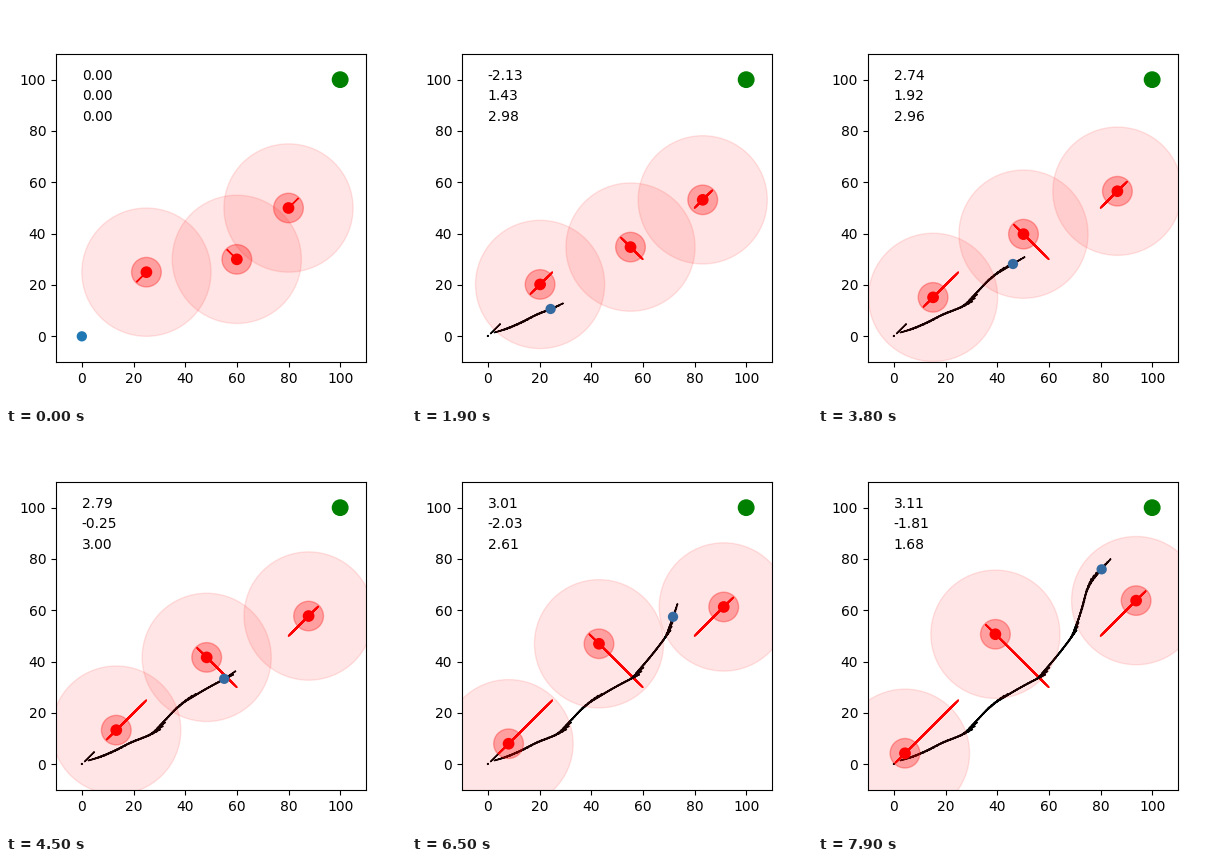
A matplotlib script that plays this animation: 400x400 px, repeating every 8000 ms.

```python
import numpy as np
import matplotlib.pyplot as plt
from matplotlib.animation import FuncAnimation

FRAMES, INTERVAL = 80, 100
SPEED, ARROW = 1.482, 5
STEPS = np.arange(FRAMES)

# start point, heading and speed per step of each obstacle
OBSTACLES = [
    ((25, 25), -3 * np.pi / 4, 0.375),
    ((60, 30), 3 * np.pi / 4, 0.375),
    ((80, 50), np.pi / 4, 0.25),
]

# the robot's heading at a few steps, linear in between
TURNS = {1: np.pi / 4, 2: 0.28, 11: 0.47, 16: 0.38, 19: 0.45, 22: 0.78,
         26: 0.82, 31: 0.70, 33: 0.58, 43: 0.48, 46: 0.83, 57: 0.93,
         60: 1.17, 68: 1.31, 71: 1.23, 75: 0.95, 78: 0.86}


def unit(angle):
    return np.stack([np.cos(angle), np.sin(angle)], axis=-1)


heading = unit(np.interp(STEPS, list(TURNS), list(TURNS.values())))
heading[0] = 0  # at rest
robot = np.cumsum(SPEED * heading, axis=0)
obstacles = [np.array(start) + speed * STEPS[:, None] * unit(angle)
             for start, angle, speed in OBSTACLES]


def bearing(k, step):
    """Angle of the robot seen from obstacle k, relative to its heading."""
    dx, dy = robot[step] - obstacles[k][step]
    a = np.arctan(dy / dx) + (np.pi if dx < 0 or dy < 0 else 0)
    return (a - OBSTACLES[k][1] + np.pi) % (2 * np.pi) - np.pi


def step_at(frame):
    return max(frame - 1, 0)


fig, ax = plt.subplots(figsize=(4, 4), dpi=100)


def add_arrow(pos, direction, color):
    return ax.arrow(*pos, *(ARROW * direction), width=0.1, color=color)


def add_disc(radius, z=1.2, **style):
    return ax.add_patch(plt.Circle((0, 0), radius, zorder=z, **style))


trail = []
for frame in range(FRAMES):
    s = step_at(frame)
    arrows = [add_arrow(robot[s], heading[s], "k")]
    arrows += [add_arrow(path[s], unit(angle), "r")
               for path, (_, angle, _) in zip(obstacles, OBSTACLES)]
    trail.append(arrows)

goal = add_disc(3, color="g")
goal.center = (100, 100)
dot = add_disc(2, z=1.1)
rings = [[add_disc(25, color="r", alpha=0.1),
          add_disc(5.75, color="r", alpha=0.3),
          add_disc(2, z=1.3, color="r")] for _ in OBSTACLES]
labels = [ax.text(0, 100 - 8 * k, "") for k in range(3)]

ax.set_xlim(-10, 110)
ax.set_ylim(-10, 110)
ax.set_xticks(range(0, 101, 20))
ax.set_yticks(range(0, 101, 20))


def update(frame):
    s = step_at(frame)
    for born, arrows in enumerate(trail):
        for arrow in arrows:
            arrow.set_visible(born <= frame)
    dot.center = tuple(robot[s])
    for k, label in enumerate(labels):
        for disc in rings[k]:
            disc.center = tuple(obstacles[k][s])
        # the readout lags one step behind the picture
        value = bearing(k, step_at(s)) if frame else 0
        label.set_text(f"{round(value, 2) + 0:.2f}")
    return []


anim = FuncAnimation(fig, update, frames=FRAMES, interval=INTERVAL,
                     init_func=lambda: update(0), repeat=True, repeat_delay=0)
plt.show()
```
